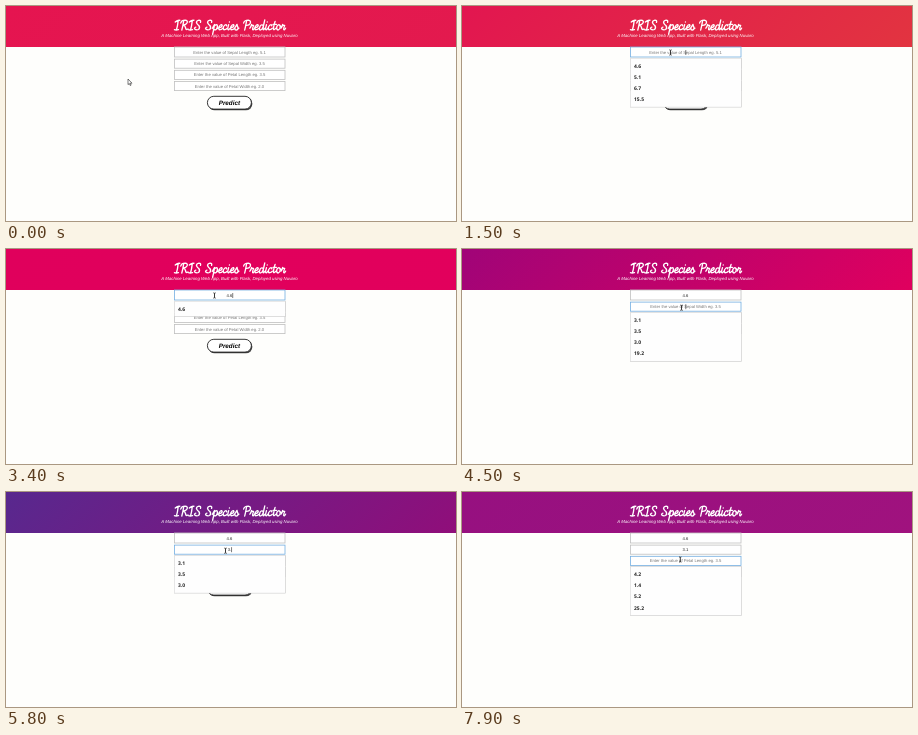
Write an HTML page that moves like this. It is 450 px wide and 215 px high and loops after 8000 ms.

```html
<!DOCTYPE html>
<html lang="en">
<head>
<meta charset="utf-8">
<title>IRIS Species Predictor</title>
<style>
  html, body { margin: 0; width: 100%; height: 100%; overflow: hidden; background: #fefefc; }
  #header { position: absolute; width: 450px; height: 41px; }
  svg { position: absolute; left: 0; top: 0; }
  text { font: 4.2px "Liberation Sans", Arial, sans-serif; text-rendering: geometricPrecision; }
  .mid { text-anchor: middle; }
  #tagline { font-size: 4.355px; font-style: italic; fill: #fff; }
  #predict { font-size: 6.3px; font-weight: bold; font-style: italic; }
  #list text { font: 600 5px "Noto Sans", "Open Sans", sans-serif; fill: #222; }
  #title { fill: none; stroke: #fff; stroke-width: 1.35; stroke-linecap: round; stroke-linejoin: round; }
  #list rect { fill: #fefefe; stroke: #e2e2e2; stroke-width: .5; filter: drop-shadow(0 .7px .6px #0005); }
</style>
</head>
<body>
<div id="header"></div>
<svg width="450" height="215" viewBox="0 0 450 215">
  <g id="title" role="img" aria-label="IRIS Species Predictor"></g>
  <text id="tagline" class="mid" x="223.5" y="31.2">A Machine Learning Web App, Built with Flask, Deployed using Nuvaro</text>
  <g id="fields"></g>
  <rect x="202.2" y="91.3" width="44.2" height="13" rx="6.5" fill="#444"/>
  <rect x="201.4" y="90.3" width="44" height="12.8" rx="6.4" fill="#fff" stroke="#222" stroke-width=".9"/>
  <text id="predict" class="mid" x="223.4" y="99">Predict</text>
  <g id="list"></g>
  <path id="caret" stroke="#222" stroke-width=".6"/>
  <path id="arrow" d="M0 0V5.6L1.3 4.5L2.2 6.5L3.1 6.1L2.2 4.2H4Z" fill="#fff" stroke="#222" stroke-width=".6"/>
  <path id="beam" d="M-1.1-2.6Q0-2.6 0-2V2Q0 2.6-1.1 2.6M1.1-2.6Q0-2.6 0-2M0 2Q0 2.6 1.1 2.6" fill="none" stroke="#222" stroke-width=".9"/>
</svg>
<script>
const $ = id => document.getElementById(id);
const LOOP = 8000, STEP = 100, PITCH = 11.2, MID = 223.5;

// Script letters: advance width and pen strokes around the baseline
const glyphs = {
  I: [5.6, 'M.6-8Q2-9.8 5-9.8M3.4-9.6Q3.4-4 2.6 0M.6-.3Q2.4 .4 4.6-.4'],
  R: [8.5, 'M3.3-8.6Q3-3 2.4 0M.6-7Q1-9.9 4.6-9.9Q7.5-9.6 7-7.2Q6.2-5 3.3-4.9Q5.6-4.4 6-2Q6.6 .3 8.4-1'],
  S: [7.5, 'M6.2-7.6Q6.6-9.9 4.4-9.9Q2-9.5 2.2-7.3Q3-5.8 5-4.3Q6.5-2 5-.5Q3 .5 .8-1.2Q.5-2.4 2-2.8'],
  P: [7.5, 'M3.4-8.6Q3-3 2.5 0M.7-7Q1-9.9 4.9-9.9Q8-9.5 7.4-6.8Q6.5-4.4 3.4-4.7'],
  p: [6, 'M0-1.5L1.8-5.5Q1.6 0 1 4.2M1.6-3.5Q3-6 4.6-5Q5.6-3 4.2-.8Q3 .4 1.7-.6M4.5-1L6-2'],
  e: [4.5, 'M.6-2.4Q3.6-2.6 3.6-4.4Q3.2-5.8 1.8-5Q0-3.6 .5-1.4Q1.6 1 4.6-1.8'],
  c: [4.3, 'M3.7-4.2Q3.4-5.8 1.8-5Q0-3.6 .5-1.4Q1.6 1 4.4-1.8'],
  i: [3, 'M1.2-5.3Q.4-1.5 1-.4Q1.8 .4 3-1.8M1.7-8v.1'],
  s: [4.2, 'M0-1.8L2-5.6Q2.2-4 3.3-2.6Q3.8 0 1.8 0Q.5 0 .3-1.2M3.3-1L4.3-1.8'],
  r: [4.5, 'M0-1.8Q1.2-3.8 1.3-5.6Q1.8-4.4 3.4-4.6Q2.4-1.4 2.9-.4Q3.6 .4 4.6-1.8'],
  d: [6, 'M4-4.6Q2.4-6 1-3.8Q0-.6 1.5 0Q3.4 0 4.4-4.4L5-10Q4-3 4.4-.6Q4.9 .4 6-1.8'],
  t: [3.8, 'M2.2-8.6Q1-3 1.4-.8Q2 .5 3.8-1.8M.4-5.6H3.8'],
  o: [5, 'M2.6-5.3Q.5-4.8 .6-2.2Q.9 0 2.5 0Q4.4-.8 4.1-3.2Q3.7-5.3 2.6-5.3M4-4.4Q4.4-3.2 5.2-3.6'],
  ' ': [3.6, '']
};
let penX = 167.8;
$('title').innerHTML = [...'IRIS Species Predictor'].map(ch => {
  const [width, d] = glyphs[ch];
  const path = `<path transform="translate(${penX} 24) skewX(-6)" d="${d}"/>`;
  penX += width;
  return path;
}).join('');

const hints = ['Sepal Length eg. 5.1', 'Sepal Width eg. 3.5', 'Petal Length eg. 3.5', 'Petal Width eg. 2.0']
  .map(s => 'Enter the value of ' + s);
const past = [['4.6', '5.1', '6.7', '15.5'], ['3.1', '3.5', '3.0', '19.2'], ['4.2', '1.4', '5.2', '25.2'], []];

// time, focused field, typed values, list open
const states = [
  [0, -1, [], 0],
  [1100, 0, [], 1],
  [2900, 0, ['4'], 1],
  [3000, 0, ['4.'], 1],
  [3200, 0, ['4.6'], 1],
  [3700, 0, ['4.6'], 0],
  [4300, 1, ['4.6'], 1],
  [5600, 1, ['4.6', '3'], 1],
  [5800, 1, ['4.6', '3.'], 1],
  [6000, 1, ['4.6', '3.1'], 1],
  [6400, 1, ['4.6', '3.1'], 0],
  [7000, 2, ['4.6', '3.1'], 1]
];

// time, pointer x, y
const pointer = [[0, 122, 73], [200, 122, 73], [900, 208.5, 46.5], [3700, 208.5, 46.5],
  [4200, 219.5, 58.7], [6300, 219.5, 58.7], [6700, 218.3, 67.5], [LOOP, 218.3, 67.5]];

// time, left rgb, right rgb of the drifting header gradient
const sky = [
  [0, 229, 20, 80, 227, 26, 78],
  [1500, 226, 22, 80, 226, 52, 64],
  [3400, 224, 0, 92, 226, 0, 92],
  [4500, 160, 4, 120, 224, 0, 94],
  [5800, 88, 40, 142, 144, 14, 122],
  [6800, 84, 42, 144, 142, 16, 126],
  [7900, 150, 16, 128, 160, 18, 126],
  [LOOP, 154, 14, 128, 164, 16, 124]
];

function sample(keys, t) {
  const i = Math.max(1, keys.findIndex(k => k[0] > t));
  const a = keys[i - 1], b = keys[i], u = (t - a[0]) / (b[0] - a[0]);
  return a.slice(1).map((v, j) => v + (b[j + 1] - v) * u);
}

function fieldMarkup(hint, i, focus, value) {
  const top = i ? 41.9 + i * PITCH : 41, bottom = 51 + i * PITCH;
  return `<rect x="168.5" y="${top}" width="110.5" height="${bottom - top}" fill="#fff"
    stroke="${focus === i ? '#74aee2' : '#c0c0c0'}" stroke-width=".8"/>
    <text class="mid" x="${MID}" y="${48 + i * PITCH}" fill="${value ? '#222' : '#777'}">${value || hint}</text>`;
}

function listMarkup(field, value) {
  const items = past[field].filter(s => s.startsWith(value));
  const top = 52.2 + field * PITCH;
  return `<rect x="168.3" y="${top}" width="111" height="${4 + items.length * PITCH}"/>` +
    items.map((s, i) => `<text x="172" y="${top + 9.3 + i * PITCH}">${s}</text>`).join('');
}

function draw(t) {
  const [since, focus, values, open] = states.findLast(s => s[0] <= t);
  const typed = values[focus] || '';

  const c = sample(sky, t).map(Math.round);
  $('header').style.background = `linear-gradient(135deg, rgb(${c.slice(0, 3)}), rgb(${c.slice(3)}))`;

  $('fields').innerHTML = hints.map((h, i) => fieldMarkup(h, i, focus, values[i])).join('');
  $('list').innerHTML = open ? listMarkup(focus, typed) : '';

  const caretOn = focus >= 0 && (t - since) % 1000 < 500;
  const textWidth = [...typed].reduce((w, ch) => w + (ch === '.' ? 1.17 : 2.34), 0);
  $('caret').setAttribute('d', caretOn ? `M${MID + textWidth / 2 + .3} ${44 + focus * PITCH}v5` : '');

  const [x, y] = sample(pointer, t);
  const overText = x > 168 && y < 86;
  for (const id of ['arrow', 'beam']) {
    $(id).setAttribute('transform', `translate(${x} ${y})`);
    $(id).style.display = (id === 'beam') === overText ? '' : 'none';
  }
}

const start = performance.now();
let last = -1;
function tick() {
  const t = Math.floor((performance.now() - start) % LOOP / STEP) * STEP;
  if (t !== last) draw(last = t);
  requestAnimationFrame(tick);
}
tick();
</script>
</body>
</html>
```
